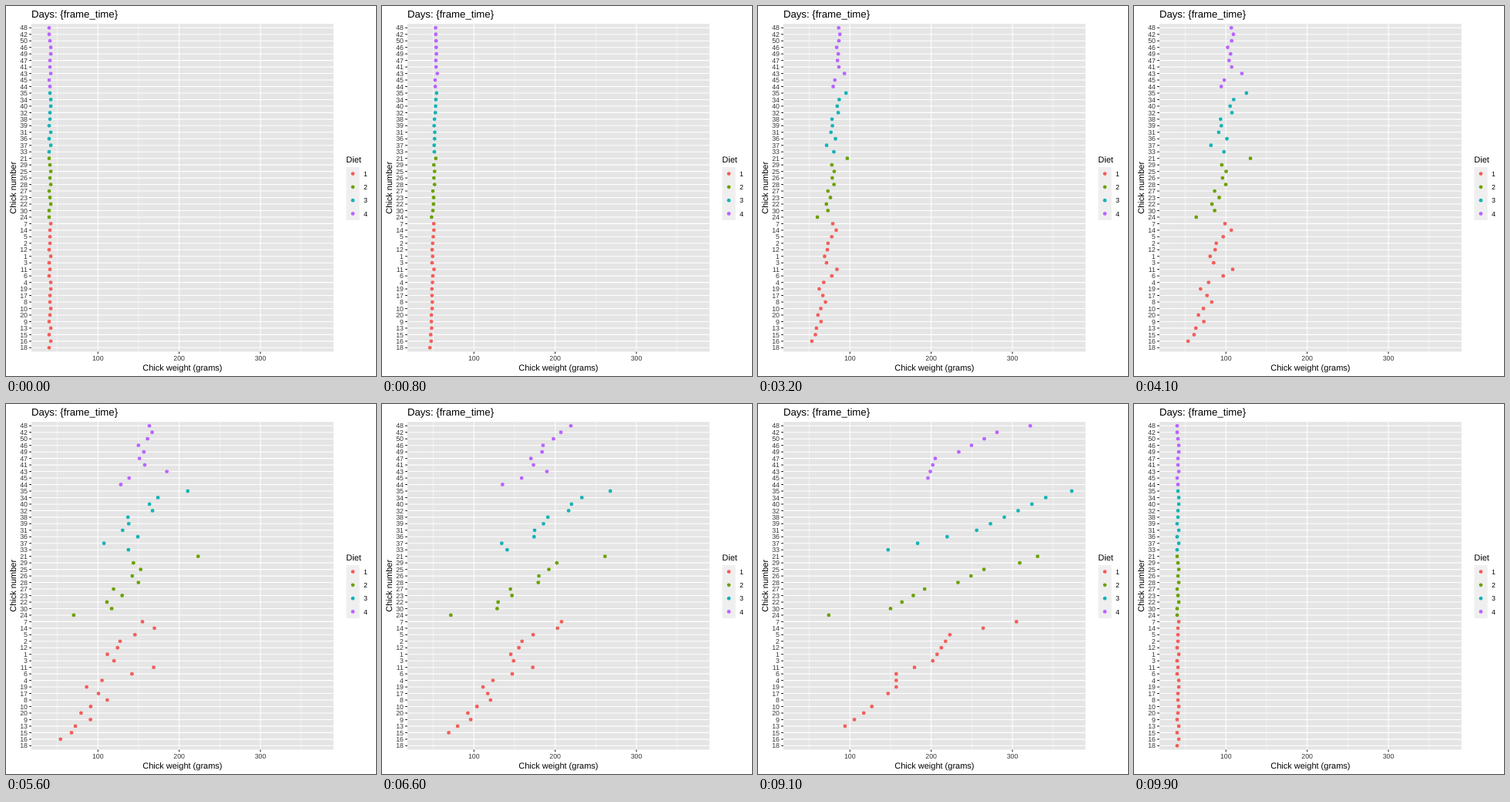
Recreate the animation shown at these times as an HTML page. Size 480x480 px, loop 10000 ms.

```html
<!DOCTYPE html>
<html lang="en">
<head>
<meta charset="utf-8">
<title>Chick weights</title>
<style>
  html, body { margin: 0; width: 100%; height: 100%; overflow: hidden; background: #fff; }
  svg { display: block; width: 100vw; height: 100vh; }
  text { font-family: "Liberation Sans", Arial, sans-serif; font-size: 11px; text-rendering: geometricPrecision; }
  .title { font-size: 13.2px; }
  .tick { font-size: 8.8px; fill: #363636; }
  .key { font-size: 8.8px; }
  .major { stroke: #fff; stroke-width: 1.07; }
  .minor { stroke: #fff; stroke-width: .53; }
  .mark { stroke: #202020; stroke-width: 1.07; }
</style>
</head>
<body>
<svg id="chart" viewBox="0 0 480 480"></svg>
<script>
const chart = document.getElementById('chart');
const panel = { left: 32.9, right: 424.83, top: 23.2, bottom: 448.4 };
const colours = ['#f35e5a', '#6ba204', '#17b3b7', '#b964ff'];

// Chicks from top to bottom, and their weights on day 12
const order = [
  48, 42, 50, 46, 49, 47, 41, 43, 45, 44,
  35, 34, 40, 32, 38, 39, 31, 36, 37, 33,
  21, 29, 25, 26, 28, 27, 23, 22, 30, 24,
  7, 14, 5, 2, 12, 1, 3, 11, 6, 4, 19, 17, 8, 10, 20, 9, 13, 15, 16, 18
];
const middles = [
  154, 160, 155, 144, 152, 148, 155, 184, 135, 127,
  201, 164, 154, 159, 128, 130, 123, 145, 103, 137,
  217, 134, 146, 136, 145, 115, 127, 108, 115, 70,
  146, 164, 141, 122, 119, 106, 115, 168, 141, 102, 82, 98, 110, 89, 77, 90, 71, 67, 54, 39
];
// Final weights fall off within each diet: [row, grams]
const finals = [
  [0, 322], [1, 281], [4, 234], [5, 205], [8, 196], [9, 148],
  [10, 373], [11, 341], [16, 256], [19, 147],
  [20, 331], [21, 309], [22, 265], [24, 233], [25, 192], [28, 150], [29, 74],
  [30, 305], [32, 223], [36, 202], [38, 157], [40, 157], [44, 117], [46, 94], [49, 40]
];
const lastDay = { 8: 20, 15: 14, 16: 12, 18: 2, 44: 18 };

const days = [0, 2, 4, 6, 8, 10, 12, 14, 16, 18, 20, 21];
const moveStart = [500, 1400, 2300, 3200, 4100, 4900, 5600, 6400, 7200, 8000, 8800, 9600];
const stepMs = 100, loopMs = 10000;

const mix = (a, b, share) => a + (b - a) * share;
const xOf = grams => mix(panel.left, panel.right, (grams - 18.1) / 371.8);
const yOf = row => mix(panel.top, panel.bottom, (row + 0.6) / 50.2);
const dietOf = id => id <= 20 ? 0 : Math.ceil(id / 10) - 2;

function finalWeight(row) {
  const next = finals.findIndex(([r]) => r >= row);
  const [r1, w1] = finals[next];
  if (r1 === row) return w1;
  const [r0, w0] = finals[next - 1];
  return mix(w0, w1, (row - r0) / (r1 - r0));
}

// Even growth to day 4, geometric to day 12, then even again
function weightOn(id, row, day) {
  if (day > (lastDay[id] ?? 21)) return null;
  const middle = middles[row];
  const hatched = 40 + id * 2 % 3;
  const early = 49 + 2 * dietOf(id) + 0.07 * middle;
  if (day <= 4) return mix(hatched, early, day / 4);
  if (day <= 12) return early * (middle / early) ** ((day - 4) / 8);
  return mix(middle, finalWeight(row), (day - 12) / 9);
}

function add(tag, attrs, label) {
  const node = document.createElementNS(chart.namespaceURI, tag);
  for (const name in attrs) node.setAttribute(name, attrs[name]);
  if (label !== undefined) node.textContent = label;
  return chart.appendChild(node);
}
const line = (cls, x1, y1, x2, y2) => add('line', { class: cls, x1, y1, x2, y2 });
const box = (x, y, width, height, fill) => add('rect', { x, y, width, height, fill });
const dot = (cx, cy, diet) => add('circle', { cx, cy, r: 2.4, fill: colours[diet] });
const text = (label, x, y, cls = '', anchor = 'start') =>
  add('text', { x, y, class: cls, 'text-anchor': anchor }, label);

function drawAxes() {
  const { left, right, top, bottom } = panel;
  box(left, top, right - left, bottom - top, '#e5e5e5');
  for (const g of [50, 150, 250, 350]) line('minor', xOf(g), top, xOf(g), bottom);
  order.forEach((id, row) => {
    const y = yOf(row);
    line('major', left, y, right, y);
    line('mark', left - 2.75, y, left, y);
    text(id, left - 4.95, y + 3.15, 'tick', 'end');
  });
  for (const g of [100, 200, 300]) {
    line('major', xOf(g), top, xOf(g), bottom);
    line('mark', xOf(g), bottom, xOf(g), bottom + 2.75);
    text(g, xOf(g), 459.8, 'tick', 'middle');
  }
  text('Days: {frame_time}', left, 15, 'title');
  text('Chick weight (grams)', (left + right) / 2, 472.6, '', 'middle');
  text('Chick number', 0, 0, '', 'middle')
    .setAttribute('transform', `translate(13.2 ${(top + bottom) / 2}) rotate(-90)`);
}

function drawLegend() {
  const size = 17.28, x = 441.33, y = 208.95;
  text('Diet', x, 203);
  box(x, y, size, size * 4, '#efefef');
  colours.forEach((_, i) => {
    const centre = y + size * (i + 0.5);
    dot(x + size / 2, centre, i);
    text(i + 1, 464.1, centre + 3.15, 'key');
  });
}

drawAxes();
drawLegend();
const chicks = order.map((id, row) => ({
  weights: days.map(day => weightOn(id, row, day)),
  node: dot(0, yOf(row), dietOf(id))
}));

function render(time) {
  const t = time % loopMs;
  // Before the first move the chart rests where the last one ended
  const move = t < moveStart[0] ? days.length - 1 : moveStart.findLastIndex(start => t >= start);
  const elapsed = (t - moveStart[move] + loopMs) % loopMs;
  const steps = move === 5 ? 3 : 4;
  const share = Math.min(1, (Math.floor(elapsed / stepMs) + 1) / steps);
  for (const { weights, node } of chicks) {
    const from = weights[move], to = weights[(move + 1) % days.length];
    // Chicks join or leave only when a move is complete
    const grams = share === 1 ? to : from === null ? null : mix(from, to ?? from, share);
    node.setAttribute('visibility', grams === null ? 'hidden' : 'visible');
    if (grams !== null) node.setAttribute('cx', xOf(grams));
  }
}

const began = performance.now();
function tick() {
  render(performance.now() - began);
  requestAnimationFrame(tick);
}
tick();
</script>
</body>
</html>
```
